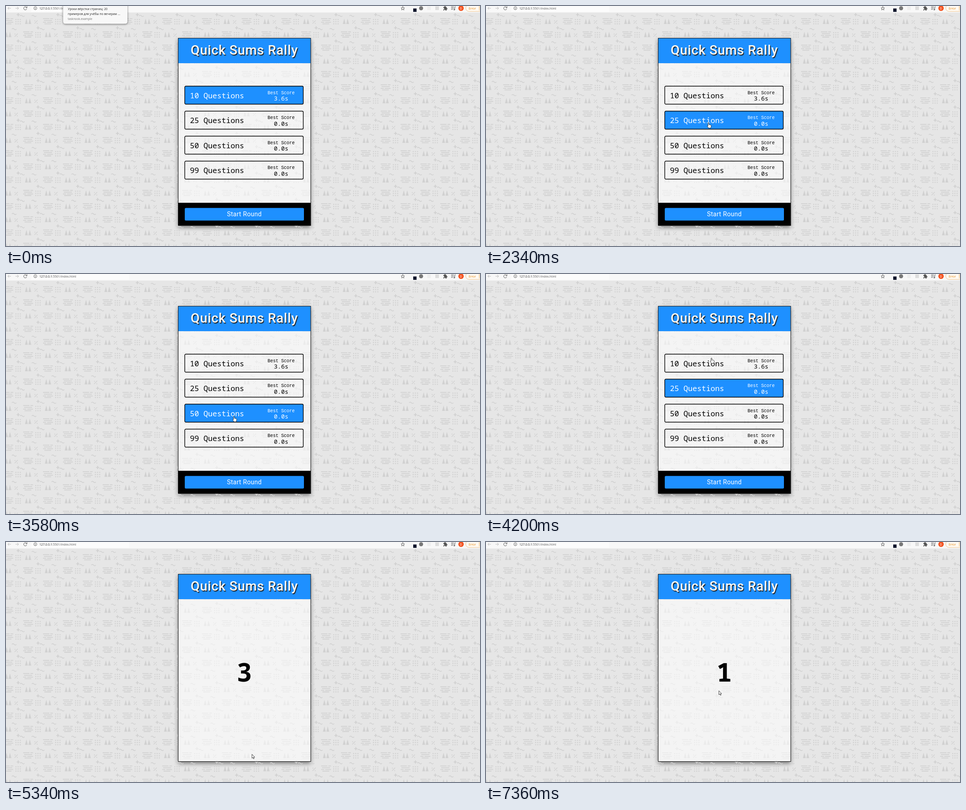
Write an HTML page that moves like this. It is 1050x533 px and loops after 8000 ms.

```html
<!DOCTYPE html>
<html lang="en">
<head>
<meta charset="utf-8">
<title>Quiz</title>
<style>
html, body { margin: 0; width: 100%; height: 100%; overflow: hidden; background: #e6e6e6; }
svg { display: block; }
text { font-family: "Noto Sans", sans-serif; white-space: pre; }
.ui, .mid { font-family: Roboto, sans-serif; }
.mid { text-anchor: middle; }
.small { font-size: 6.7px; fill: #333; }
.line { fill: none; stroke: #555; stroke-width: 1; }
.mono { font-family: "Noto Sans Mono", monospace; }
.label { font: 10px "Liberation Mono", monospace; }
.row rect { fill: none; stroke: #000; stroke-width: 1.4; }
.row.on rect { fill: #1e90ff; }
.row.on text { fill: #fff; }
</style>
</head>
<body>
<svg width="1050" height="533" viewBox="0 0 1050 533">
  <defs>
    <g id="motif" fill="#d1d1d1" stroke="#d1d1d1" stroke-width="0">
      <path d="M-7 6L-3.7-6L-.6 6ZM.6 6L3.7-6L7 6Z"/>
      <path stroke-width="1.8" d="M-11 23.5H3M5 23.5H11M-9 27.5H9M-11 31.5H-4M-2 31.5H11M-8 35H7"/>
      <path stroke-width="1.4" d="M14 5L21-2"/>
      <circle cx="15" cy="-1" r="1.1"/><circle cx="20" cy="4.5" r="1.1"/>
      <path stroke-width="2" d="M22 11V18M18.5 14.5H25.5"/>
      <path fill="none" stroke-width="1.7" d="M-18-12q2.5-3 5 0t5 0M8-12q2.5-3 5 0t5 0"/>
      <path stroke-width="2.6" stroke-linecap="round" stroke-dasharray="0 4.8" d="M-27-4H-16M-27 .8H-16M-27 5.6H-16"/>
    </g>
  </defs>

  <rect width="1050" height="533" fill="#e6e6e6"/>
  <rect x="381" y="71" width="294" height="417" fill="#e6e6e6" style="filter:drop-shadow(0 4px 5px #0007)"/>
  <g id="wall"></g>

  <!-- Browser bar -->
  <rect width="1050" height="14.5" fill="#f8f8f8"/>
  <rect x="56" width="217" height="13" fill="#fcfcfc"/>
  <g class="line">
    <path stroke="#bbb" d="M11 5H4M7 2L4 5L7 8M21 5H28M25 2L28 5L25 8"/>
    <path d="M45.5 3A3.5 3.5 0 1 0 46 6.5M46.5 1V4H43.5"/>
    <circle cx="65" cy="5" r="3.4" stroke-width=".8"/><path d="M65 4.5V7M65 2.8V3.6"/>
    <path stroke-width=".9" d="M879 1L880.2 4L883 4.2L880.8 6L881.6 9L879 7.3L876.4 9L877.2 6L875 4.2L877.8 4Z"/>
    <path d="M986 2H992M986 4.8H992M986 7.6H990M994 8V2H996"/><circle cx="993" cy="8" r="1.2"/>
  </g>
  <text class="small" x="74" y="7.6">127.0.0.1:<tspan fill="#666">5501/index.html</tspan></text>
  <rect x="902" y="5.5" width="7.5" height="7.5" fill="#10162c"/>
  <circle cx="919.5" cy="5" r="4.5" fill="#777"/>
  <rect x="933" y="1" width="8" height="8" fill="#eee"/>
  <rect x="951" y="1" width="8" height="8" fill="#ddd"/>
  <path fill="#555" d="M969 2H971Q971 0 972.5 0T974 2H976V4.5Q978 4.5 978 6T976 7.5V10H973.5Q973.5 8 972 8T970.5 10H969V7.5Q971 7.3 971 6T969 4.5Z"/>
  <circle cx="1008" cy="5" r="6" fill="#f4511e"/>
  <text class="ui mid" x="1008" y="7.5" font-size="6.5" fill="#fff">D</text>
  <rect x="1018.5" y="-3" width="42" height="15" rx="7" fill="#fffaf3" stroke="#efc48d"/>
  <text class="small" x="1025" y="7.5" style="fill:#e38a1b">Error</text>
  <path stroke="#e38a1b" stroke-width="1.4" stroke-dasharray="1.4 1.7" d="M1048.5 1.5V10"/>

  <g id="tip">
    <path fill="#f8f8f8" style="filter:drop-shadow(0 1px 2px #0008)" d="M126.5-6H269V34Q269 39.5 263.500 39.5H132Q126.500 39.5 126.500 34Z"/>
    <text class="small" x="137" y="8.7">Уроки вёрстки страниц: 20</text>
    <text class="small" x="137" y="19.700">примеров для учёбы по вечерам ...</text>
    <text class="small" x="137" y="30.700" style="fill:#777;font-size:6.300px">tasknook.example</text>
  </g>

  <!-- Game card -->
  <rect x="381" y="127" width="294" height="361" fill="#fff" fill-opacity=".58"/>
  <rect x="381" y="71" width="294" height="56" fill="#1e90ff"/>
  <text class="mid" x="528" y="108" font-size="29" font-weight="500" letter-spacing=".8" fill="#f8f8f8" style="text-shadow:1.500px 1.500px 1px #222">Quick Sums Rally</text>
  <g id="menu">
    <g id="rows"></g>
    <rect x="381" y="437" width="294" height="51"/>
    <rect x="396" y="448.500" width="264" height="28" rx="2.500" fill="#1e90ff"/>
    <text class="mid" x="528" y="467" font-size="14" letter-spacing=".3" fill="#fff">Start Round</text>
  </g>
  <text id="count" class="mono" x="528" y="310" font-size="58" font-weight="600" text-anchor="middle"></text>
  <rect x="381.500" y="71.500" width="293.500" height="416" fill="none" stroke="#111"/>

  <g id="cursor" fill="#fff" stroke="#111" stroke-width=".8" stroke-linejoin="round">
    <path id="hand" d="M-1 1Q0-.4 1 1V4.700L5 5.700Q6.200 6.100 6 8L5 12.500H.2L-2.600 8.700Q-2.800 7-1 7.600Z"/>
    <path id="arrow" d="M.4.4V9.200L2.400 7.400L3.800 10.500L5.200 9.900L3.900 6.900H6.500Z"/>
  </g>
</svg>
<script>
const $ = id => document.getElementById(id);
const LOOP = 8000, ROW_TOP = 177.5, ROW_STEP = 55.5;

let wall = '';
for (let r = -1; r < 19; r++)
  for (let c = -1; c < 13; c++)
    wall += `<use href="#motif" x="${49 + 88 * c + (r & 1) * 44}" y="${(34 + 29.33 * r).toFixed(1)}"/>`;
$('wall').innerHTML = wall;

$('rows').innerHTML = [10, 25, 50, 99].map((n, i) => `
  <g class="row" transform="translate(396 ${ROW_TOP + ROW_STEP * i})">
    <rect y=".5" width="262.5" height="40" rx="2.5"/>
    <text class="mono" x="11.5" y="27" font-size="16.67">${n} Questions</text>
    <text class="label" x="183.5" y="18">Best Score</text>
    <text class="mono" x="197.5" y="32.5" font-size="13.33">${i ? '0.0' : '3.6'}s</text>
  </g>`).join('');
const rows = [...document.querySelectorAll('.row')];

// Pointer tip: time, x, y
const path = [
  [240, 200, -20], [590, 481, 195], [1799, 481, 195], [1800, 485, 202], [2050, 490, 244],
  [2290, 490, 244], [2500, 502, 304], [2680, 502, 304], [2890, 515, 357],
  [3140, 515, 357], [3300, 505.5, 318], [3579, 505.5, 318], [3580, 505, 316],
  [3760, 503, 252], [4030, 503, 252], [4200, 499.5, 186],
  [4360, 499.5, 186], [4900, 544.5, 474], [5060, 544.5, 474], [5100, 544.5, 471],
  [5590, 544.5, 471], [6180, 515.5, 330]
];
const picks = [[0, 0], [2200, 1], [2600, 2], [2980, 3], [3580, 2], [3910, 1], [4360, 0]];

function pointer(t) {
  const k = path.findIndex(p => p[0] > t);
  if (k < 1) return (k ? path[path.length - 1] : path[0]).slice(1);
  const a = path[k - 1], b = path[k], u = (t - a[0]) / (b[0] - a[0]);
  return [1, 2].map(i => a[i] + (b[i] - a[i]) * u);
}

function clickable(t, y) {
  if (t >= 5340) return false;
  const d = y - ROW_TOP;
  return y > 448 || d >= 0 && d < 4 * ROW_STEP && d % ROW_STEP < 41;
}

function draw(t) {
  const playing = t >= 5250;
  const picked = picks.filter(p => p[0] <= t).pop()[1];
  rows.forEach((row, i) => row.classList.toggle('on', i === picked));
  $('menu').style.display = playing ? 'none' : '';
  $('count').textContent = !playing ? '' : t < 6370 ? 3 : t < 7360 ? 2 : 1;
  $('tip').style.opacity = Math.max(0, Math.min(1, 1 - (t - 240) / 200));

  const [x, y] = pointer(t), hand = clickable(t, y);
  $('cursor').setAttribute('transform', `translate(${x} ${y})`);
  $('hand').style.display = hand ? '' : 'none';
  $('arrow').style.display = hand ? 'none' : '';
}

const start = performance.now();
function tick() {
  draw((performance.now() - start) % LOOP);
  requestAnimationFrame(tick);
}
tick();
</script>
</body>
</html>
```
